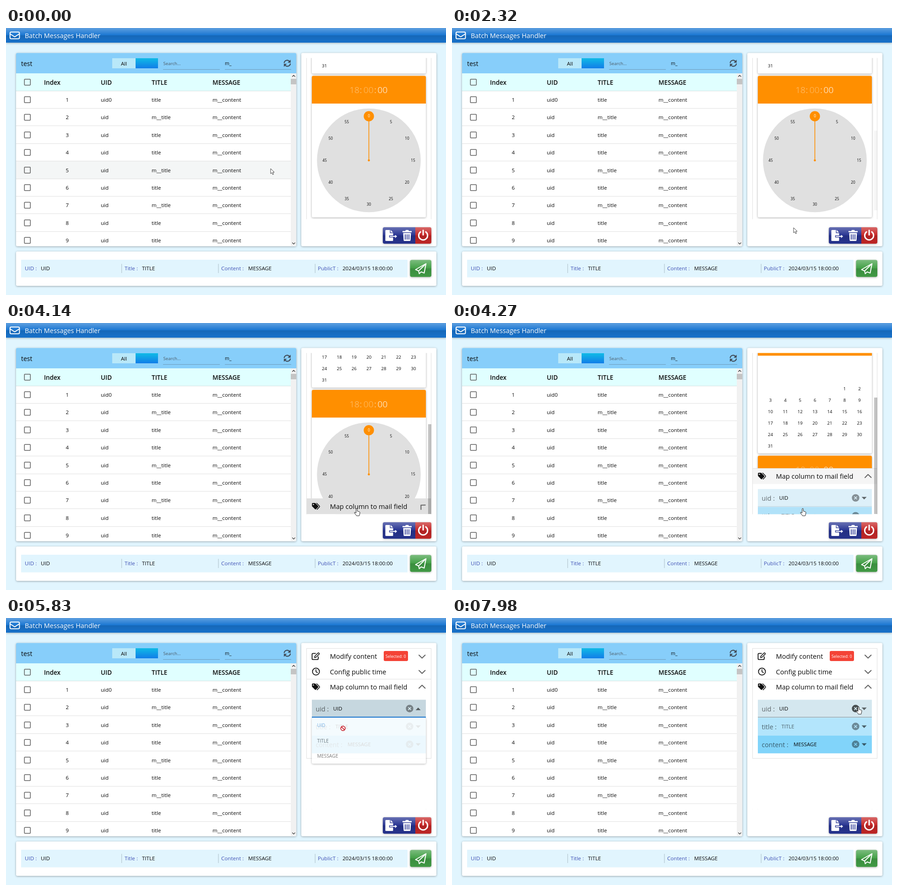
These frames come from a looping animation (961 px wide and 583 px high, 8 s). An HTML page:

```html
<!DOCTYPE html>
<html lang="en">
<head>
<meta charset="utf-8">
<title>Batch Messages Handler</title>
<style>
html, body { margin: 0; width: 100%; height: 100%; overflow: hidden; background: #e1f5fe; }
svg { display: block; font-family: "Open Sans", "Noto Sans", sans-serif; }
.card { filter: drop-shadow(0 1px 2px rgba(0,0,0,.33)); }
.button { filter: drop-shadow(0 1px 2px rgba(0,0,0,.3)); }
.line { fill: none; stroke-linecap: round; stroke-linejoin: round; }
</style>
</head>
<body>
<svg id="stage" width="961" height="583" viewBox="0 0 961 583"></svg>
<script>
// ---- drawing helpers ----
const range = (n, fn) => Array.from({ length: n }, (_, i) => fn(i));
const draw = (n, fn) => range(n, fn).join('');
const rect = (x, y, w, h, fill, more = '') =>
  `<rect x="${x}" y="${y}" width="${w}" height="${h}" fill="${fill}" ${more}/>`;
// y is the middle of the capital letters
const text = (x, y, str, size, fill = '#0a0a0a', more = '') =>
  `<text x="${x}" y="${(y + size * .36).toFixed(2)}" font-size="${size}" fill="${fill}" ${more}>${str}</text>`;
const line = (d, color, width, more = '') =>
  `<path class="line" d="${d}" stroke="${color}" stroke-width="${width}" ${more}/>`;
const shape = (d, fill, more = '') => `<path d="${d}" fill="${fill}" ${more}/>`;
const circle = (x, y, r, fill, more = '') => `<circle cx="${x}" cy="${y}" r="${r}" fill="${fill}" ${more}/>`;
const card = (x, y, w, h) => rect(x, y, w, h, '#fff', 'class="card" rx="3"');
const glossy = (x, y, w, h, color, rx = 0) =>
  rect(x, y, w, h, color, `rx="${rx}"`) + rect(x, y, w, h, 'url(#gloss)', `rx="${rx}"`);
const MID = 'text-anchor="middle"', BOLD = 'font-weight="600"', MEDIUM = 'font-weight="500"';

const defs = `<defs>
  <linearGradient id="gloss" x2="0" y2="1">
    <stop stop-color="#fff" stop-opacity=".3"/><stop offset=".5" stop-color="#fff" stop-opacity="0"/>
    <stop offset=".51" stop-opacity=".12"/><stop offset="1" stop-opacity=".04"/>
  </linearGradient>
  <linearGradient id="sky" x2="0" y2="1">
    <stop stop-color="#10bbe6"/><stop offset="1" stop-color="#117de8"/>
  </linearGradient>
  <clipPath id="view"><rect x="656" y="65.5" width="273" height="352"/></clipPath>
</defs>`;

function appBar() {
  return `<g class="button">${glossy(0, 0, 961, 32, '#1976d2')}</g>`
    + rect(8.8, 8.8, 20.6, 14.6, 'none', 'rx="2.5" stroke="#fff" stroke-width="2"')
    + line('M9 13L17.5 18.4q1.5 1 3 0L29 13', '#fff', 2)
    + text(41, 16.5, 'Batch Messages Handler', 14.4, '#fff');
}

function tableCard() {
  const heads = { Index: 83, UID: 207, TITLE: 318, MESSAGE: 451 };
  const box = y => rect(40.2, y - 6.4, 13, 13, 'none', 'rx="1.2" stroke="#5f5f5f" stroke-width="1.5"');
  const row = i => {
    const y = 156.8 + 38.4 * i, n = i + 1;
    return (n < 9 ? rect(22, Math.round(y + 18.2), 600, 1, '#e0e0e0') : '') + box(y - .3)
      + text(137, y, n, 11.5, '#0a0a0a', 'text-anchor="end"')
      + text(heads.UID, y, i ? 'uid' : 'uid0', 11.6)
      + text(heads.TITLE, y, [2, 5, 7].includes(n) ? 'm__title' : 'title', 11.6)
      + text(heads.MESSAGE, y, 'm__content', 11.6);
  };
  const arrow = line('M607.6 75.8A6.6 6.6 0 0 1 619 72.6', '#3f4a56', 2.1) + shape('M621.7 69.2v6.6h-6.6z', '#3f4a56');
  return card(22, 54.5, 612, 422)
    + shape('M22 99V57.5a3 3 0 0 1 3-3H631a3 3 0 0 1 3 3V99z', '#87cefa')
    + text(33, 78, 'test', 14)
    + rect(232, 66, 51, 22, '#b9e8f9') + text(257.5, 77.5, 'All', 11.6, '#0a0a0a', MID)
    + rect(283, 66, 49, 22, 'url(#sky)')
    + text(343.5, 77.5, 'Search...', 9.7, '#4c5b66') + rect(343, 90, 124, 1, '#6e9cba')
    + text(478, 77.5, 'm_', 10.4) + rect(478, 90, 145, 1, '#6e9cba')
    + arrow + `<g transform="rotate(180 614.3 77)">${arrow}</g>`
    + rect(22, 99, 600, 38, '#e0ffff') + rect(22, 137, 600, 1, '#d5e2e2') + box(118.2)
    + Object.entries(heads).map(([s, x]) => text(x, 118.8, s, 13.5, '#0a0a0a', BOLD)).join('')
    + rect(22, 291, 600, 38, '#f4f6f6', 'id="rowHover"')
    + draw(9, row)
    + rect(622, 99, 12, 376, '#f1f1f1') + rect(622, 111, 12, 12, '#c4c4c4')
    + line('M625.5 106l2.8-2.8 2.8 2.8', '#444', 1.3) + line('M625.5 469l2.8 2.8 2.8-2.8', '#444', 1.3);
}

function timePicker() {
  const days = draw(31, i => {
    const cell = i + 5;
    return text(695.5 + 32.4 * (cell % 7), 25 * Math.floor(cell / 7) - 42, i + 1, 9.6, '#0a0a0a', MID);
  });
  const ticks = draw(12, i => {
    const a = i * Math.PI / 6;
    return text(792.5 + 96.5 * Math.sin(a), 289 - 96.5 * Math.cos(a), i * 5, 8.3, i ? '#0a0a0a' : '#fff', MID);
  });
  const part = (i, s, a) => text(761 + 30.7 * i, 135.3, s, 19, '#fff', `${MID} font-weight="300" opacity="${a}"`);
  return '<g transform="translate(0 319)">'
    + card(668, -174, 249, 273.5) + rect(668, -174, 249, 60, '#ff8f00') + days
    + card(668, 104.5, 249, 309)
    + shape('M668 165v-57.5a3 3 0 0 1 3-3H914a3 3 0 0 1 3 3V165z', '#ff8f00')
    + part(0, '18', .5) + part(.46, ':', .8) + part(1, '00', .42) + part(1.48, ':', 1) + part(2, '00', 1)
    + circle(792.5, 289, 113.3, '#e0e0e0')
    + rect(791.7, 193, 1.6, 96, '#ff8f00') + circle(792.5, 289, 2.3, '#ff8f00') + circle(792.5, 192.7, 11.2, '#ff8f00')
    + ticks + '</g>';
}

const FIELDS = ['uid', 'title', 'content'];
const fieldTop = i => 178.5 + 39 * i;

function field(i, color, value, x) {
  const id = FIELDS[i], y = fieldTop(i), m = y + 19.3;
  return rect(668, y, 249, 39, color) + rect(668, y, 249, 38.5, '#000', `id="${id}Shade"`)
    + rect(668, y + 37.7, 249, 1, '#000', `id="${id}Rule"`)
    + text(676.5, m + .8, id + ' :', 14.2, '#000', MEDIUM + ' fill-opacity=".56"')
    + text(x, m + .3, value, 11.4, '#0a0a0a', `id="${id}Value"`)
    + circle(881.5, m, 8.2, '#000', `id="${id}Clear" opacity=".4"`)
    + line(`M878.9 ${m - 2.6}l5.2 5.2m0-5.2l-5.2 5.2`, color, 1.5)
    + `<g transform="translate(900.2 ${m + .6})">${shape('M-5.5-2.8h11L0 2.8z', '#000', `id="${id}Caret" fill-opacity=".58"`)}</g>`;
}

function sidePanel() {
  const title = (y, s) => text(707.5, y, s, 14.6);
  const chevron = (y, id) =>
    `<g transform="translate(908.7 ${y})">${line('M-6.7-3.3L0 3.3 6.7-3.3', '#666', 2.1, `id="${id}"`)}</g>`;
  const heads = title(84, 'Modify content') + chevron(84.3, 'modifyChevron')
    + title(117.5, 'Config public time') + chevron(117.8, 'configChevron')
    + rect(825, 72, 53, 22, '#f44336', 'rx="3"') + text(851.3, 83.3, 'Selected: 0', 8.9, '#fff', MID)
    + line('M676 77.3h-5.5a2 2 0 0 0-2 2v9.4a2 2 0 0 0 2 2h9.4a2 2 0 0 0 2-2v-4', '#111', 1.8)
    + line('M674 86.5l.6-3.2 6.9-6.9q1.2-.8 2.3.3 1.1 1.1.2 2.2l-6.9 6.9z', '#111', 1.6)
    + circle(677, 117, 7.6, 'none', 'stroke="#111" stroke-width="1.8"') + line('M677 112.5v4.8l3.2 2', '#111', 1.6);
  const tags = shape('M668.3 144.5q0-1.5 1.5-1.5h5.5l6.6 6.6q1 1 0 2l-5 5q-1 1-2 0l-6.6-6.7z', '#111')
    + circle(671.5, 146.2, 1.2, '#fff')
    + line('M678.5 143.5l6 6q1 1.1 0 2.2l-5 5.2', '#111', 1.6);
  return card(645, 54.5, 295, 422)
    + '<g clip-path="url(#view)"><g id="scroll">'
    + rect(656.5, 66.5, 272, 900, '#fff', 'stroke="#e0e0e0"') + heads + timePicker() + '</g><g id="map">'
    + rect(655, 134, 276, 700, '#fff') + rect(656.5, 133.5, 272, 173, '#fff', 'stroke="#e0e0e0"')
    + rect(656.5, 134, 272, 33.5, '#e0e0e0', 'id="mapHover"')
    + tags + title(151, 'Map column to mail field') + chevron(150, 'mapChevron')
    + field(0, '#e1f5fe', 'UID', 714.5) + field(1, '#b3e5fc', 'TITLE', 719.5) + field(2, '#81d4fa', 'MESSAGE', 746)
    + '</g>' + rect(922, 0, 7, 0, '#000', 'id="thumb"') + '</g>'
    + `<g id="popup">${card(668, 217.5, 249, 100.5)}`
    + text(679.5, 234.7, 'UID', 10.3, '#1976d2', 'opacity=".6"')
    + text(679.5, 268, 'TITLE', 10.3, '#666') + text(679.5, 301.3, 'MESSAGE', 10.3, '#666') + '</g>'
    + `<g transform="translate(792.5 215.5)">${rect(-124.5, 0, 249, 2, '#1976d2', 'id="focus"')}</g>`
    + actions();
}

function actions() {
  return '<g class="button">'
    + shape('M894 435H827a4 4 0 0 0-4 4v28a4 4 0 0 0 4 4h67z', '#283593')
    + shape('M894 435h31a4 4 0 0 1 4 4v28a4 4 0 0 1-4 4h-31z', '#c62828') + '</g>'
    + rect(823, 435, 106, 36, 'url(#gloss)', 'rx="4"')
    + shape('M830 441h8.5v7h7v15.500q0 1.500-1.500 1.500h-14q-1.500 0-1.500-1.500v-21q0-1.500 1.500-1.500zM840 441l5.500 5.500h-5.500z', '#fff')
    + shape('M837.5 453.3h11.5v-3.6l6 5.3-6 5.3v-3.6h-11.5z', '#fff', 'stroke="#283593" stroke-width="1.3"')
    + shape('M866 443.2h6l1.2-2.2h5.6l1.2 2.2h6v2.8h-20zM867.5 447.5h17l-1 16q-.1 1.5-1.6 1.5h-11.8q-1.5 0-1.6-1.5z', '#fff')
    + draw(3, i => rect(871 + 4.1 * i, 450.5, 1.8, 11.5, '#283593'))
    + line('M905.3 445.2a9.7 9.7 0 1 0 11.6 0M911.1 441.8v10', '#fff', 3);
}

function footer() {
  const part = (x, label, gap, value) =>
    text(x, 525, label, 11.6, '#3f51b5', MEDIUM) + text(x + gap, 525, value, 11.5);
  return card(22, 488, 918, 75) + rect(33, 506, 844, 38.5, '#e1f5fe')
    + part(41, 'UID :', 35, 'UID') + part(259, 'Title :', 38, 'TITLE')
    + part(470, 'Content :', 59, 'MESSAGE') + part(681, 'PublicT :', 54, '2024/03/15 18:00:00')
    + draw(3, i => rect(252 + 211.3 * i, 515, 1.2, 20, '#b4c6d0'))
    + `<g class="button">${glossy(882.5, 506.5, 46.5, 37, '#43a047', 4)}</g>`
    + line('M917.3 514.5L894.5 527.5l6.7 3 1.3 6 4.3-4 6.5 2.7zM901.2 530.5L917.3 514.5', '#fff', 2);
}

const pointer = '<g id="cursor">'
  + shape('M0 0v11.2l2.6-2.4 1.9 4.3 2-.9-1.9-4.2h3.5z', '#fff', 'id="arrow" stroke="#333" stroke-width=".9"')
  + shape('M-1.3 1.3a1.3 1.3 0 0 1 2.6 0v4.5l4.4 1.2q1.5.6 1.3 2.2l-.7 4.2-.8 2.6h-6l-1-1.8-3.4-4.4q-.6-1.4.8-1.6l2.8 1.6z', '#fff', 'id="hand" stroke="#222"')
  + `<g id="deny">${circle(0, 0, 4.8, '#fff', 'stroke="#c8202c" stroke-width="1.8"')}${line('M-3.2-3.2L3.2 3.2', '#c8202c', 1.8)}</g></g>`;

document.getElementById('stage').innerHTML =
  defs + rect(0, 0, 961, 583, '#e1f5fe') + appBar() + tableCard() + sidePanel() + footer() + pointer;

// ---- motion: everything follows from the pointer's path and three clicks ----
const LOOP = 8000, STEP = 67.35, FIRST = 1380;
const EXPAND = 3993, OPEN = 5640, CLOSE = 6960;
const VIEW = 351, CONFIG = 607, MAP = 140;

const ramp = (t, start, span) => Math.min(1, Math.max(0, (t - start) / span));
const smooth = u => u * u * (3 - 2 * u);
const easeOut = u => u * (2 - u);

// each move: start, duration, destination
const MOVES = [
  [1380, 400, 757, 411], [2060, 260, 746, 436], [2980, 480, 757, 380], [3610, 290, 766, 405],
  [4690, 125, 718, 345], [4815, 480, 735, 192], [5640, 180, 736, 241], [5900, 500, 693, 305],
  [6760, 190, 722, 352], [7180, 700, 888, 194]];

function cursorAt(t) {
  let x = 578, y = 307;
  for (const [start, span, toX, toY] of MOVES) {
    const u = smooth(ramp(t, start, span));
    x += (toX - x) * u;
    y += (toY - y) * u;
  }
  return { x, y };
}

// accordion: one section shrinks, the other grows, scrolling is limited by what is left
function layoutAt(t) {
  const left = CONFIG * (1 - ramp(t, EXPAND, 410) ** 2);
  const total = 101 + left + MAP * ramp(t, EXPAND + 170, 240);
  const scroll = Math.min(319 + 38 * smooth(ramp(t, 3080, 390)), Math.max(0, total - VIEW));
  return { total, scroll, mapShift: left - scroll };
}

const inside = ({ x, y }, left, top, w, h) => x >= left && x < left + w && y >= top && y < top + h;
const popupOn = t => t > OPEN && t < CLOSE;
const overPopup = t => popupOn(t) && inside(cursorAt(t), 668, 217.5, 249, 101);
const overField = (t, i) => !overPopup(t) && inside(cursorAt(t), 668, fieldTop(i) + layoutAt(t).mapShift, 249, 39);
const overMap = t => inside(cursorAt(t), 657, 134 + layoutAt(t).mapShift, 272, 33.5);
const overView = t => inside(cursorAt(t), 657, 66, 272, VIEW);
const overRow = t => inside(cursorAt(t), 22, 291, 600, 38);
const overClear = t => overField(t, 0) && cursorAt(t).x > 872;

// share of the last 180 ms for which the test held: a linear fade in and out
const level = (t, test) => range(6, j => +test(t - 30 * j)).reduce((a, b) => a + b) / 6;

const set = (id, attrs) => {
  const el = document.getElementById(id);
  for (const k in attrs) el.setAttribute(k, attrs[k]);
};
const fade = (id, opacity) => set(id, { opacity });
const transform = (id, value) => set(id, { transform: value });

function render(t) {
  const { x, y } = cursorAt(t), { total, scroll, mapShift } = layoutAt(t);
  const focus = smooth(ramp(t, OPEN - 120, 300)) - smooth(ramp(t, CLOSE - 10, 300));

  const overAny = overMap(t) || FIELDS.some((_, i) => overField(t, i));
  const kind = overPopup(t) ? 'deny' : overAny && y < 417 ? 'hand' : 'arrow';
  transform('cursor', `translate(${x} ${y})`);
  ['arrow', 'hand', 'deny'].forEach(id => fade(id, +(id === kind)));

  fade('rowHover', level(t, overRow));
  fade('mapHover', level(t, overMap));
  transform('scroll', `translate(0 ${-scroll})`);
  transform('map', `translate(0 ${mapShift})`);
  transform('mapChevron', `rotate(${180 * easeOut(ramp(t, EXPAND, 300))})`);

  const seen = t > FIRST + 70 && total > VIEW;
  set('thumb', {
    y: 66 + scroll * VIEW / total, height: VIEW * VIEW / total,
    opacity: seen ? Math.max(.04, .24 * level(t, overView)) : 0
  });

  FIELDS.forEach((id, i) => {
    const hover = level(t, u => overField(u, i)), active = i ? 0 : focus;
    fade(id + 'Shade', Math.max(.06 * hover, .12 * active));
    fade(id + 'Rule', .45 * Math.max(hover, active));
  });
  fade('titleValue', 1 - .4 * ramp(t, 7650, 300));
  fade('uidClear', .4 + .26 * level(t, overClear));
  transform('uidCaret', `rotate(${-180 * focus})`);
  transform('focus', `scale(${focus} 1)`);
  fade('popup', easeOut(ramp(t, OPEN, 300)) - easeOut(ramp(t, CLOSE + 10, 300)));
}

const snap = t => FIRST + STEP * Math.floor((t - FIRST + 8) / STEP);
const begin = performance.now();
function tick() {
  render(snap((performance.now() - begin) % LOOP));
  requestAnimationFrame(tick);
}
tick();
</script>
</body>
</html>
```
